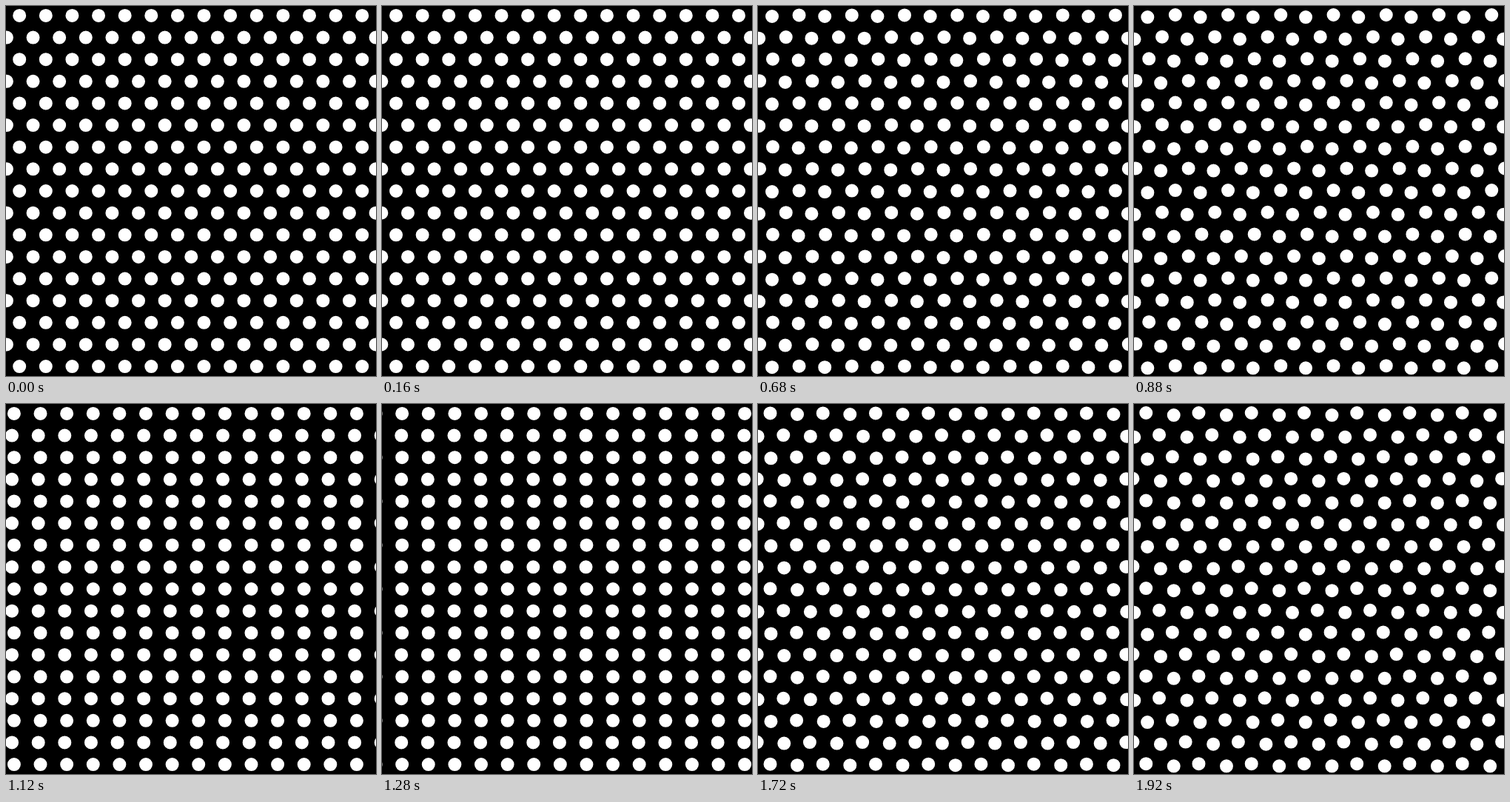
These frames come from a looping animation (500 px wide and 500 px high, 2040 ms). An HTML page with a canvas:

```html
<!DOCTYPE html>
<html lang="en">
<head>
<meta charset="utf-8">
<title>Sliding dots</title>
<style>
  html, body { margin: 0; width: 100%; height: 100%; overflow: hidden; background: #000; }
  canvas { display: block; width: 500px; height: 500px; }
</style>
</head>
<body>
<canvas id="stage" width="500" height="500"></canvas>
<script>
const ctx = document.getElementById('stage').getContext('2d');
const SIZE = 500, MID = 250, GAP = 35.62, ROW = 29.64, RADIUS = 9;
const LOOP = 2040, STEP = 40, PHASE = 520, MOVES = 10;
// Slide lengths in lattice steps: both stop just short of two.
const FORTH = 1.97, BACK = -1.925;

// Neighbouring lines slide opposite ways along (dx, dy).
const across = { dx: -GAP, dy: 0, drift: 0, line: (u, r) => r };
const rising = { dx: -GAP / 2, dy: ROW, drift: 1.2, line: (u, r) => u + r / 2 - 0.5 };
const falling = { dx: GAP / 2, dy: ROW, drift: -1.7, line: (u, r) => u - r / 2 + 0.5 };
const phases = [across, rising, across, falling];

const ease = p => p < 0.5 ? 4 * p ** 3 : 1 - 4 * (1 - p) ** 3;
const isEven = n => Math.round(n) % 2 === 0;

function draw(ms) {
  const t = ms % LOOP + STEP;
  const phase = phases[Math.floor(t / PHASE)];
  const step = Math.min(MOVES, Math.floor(t % PHASE / STEP));
  const progress = ease(step / MOVES);

  ctx.fillStyle = '#000';
  ctx.fillRect(0, 0, SIZE, SIZE);
  ctx.fillStyle = '#fff';
  ctx.beginPath();
  for (let r = -4; r <= 20; r++) {
    for (let k = -11; k <= 11; k++) {
      const u = isEven(r) ? k + 0.5 : k;
      const shift = progress * (isEven(phase.line(u, r)) ? FORTH : BACK);
      const x = MID + u * GAP + shift * phase.dx + phase.drift;
      const y = MID + (r - 8) * ROW + shift * phase.dy;
      ctx.moveTo(x + RADIUS, y);
      ctx.arc(x, y, RADIUS, 0, 2 * Math.PI);
    }
  }
  ctx.fill();
}

const start = performance.now();
function tick() {
  draw(performance.now() - start);
  requestAnimationFrame(tick);
}
tick();
</script>
</body>
</html>
```
